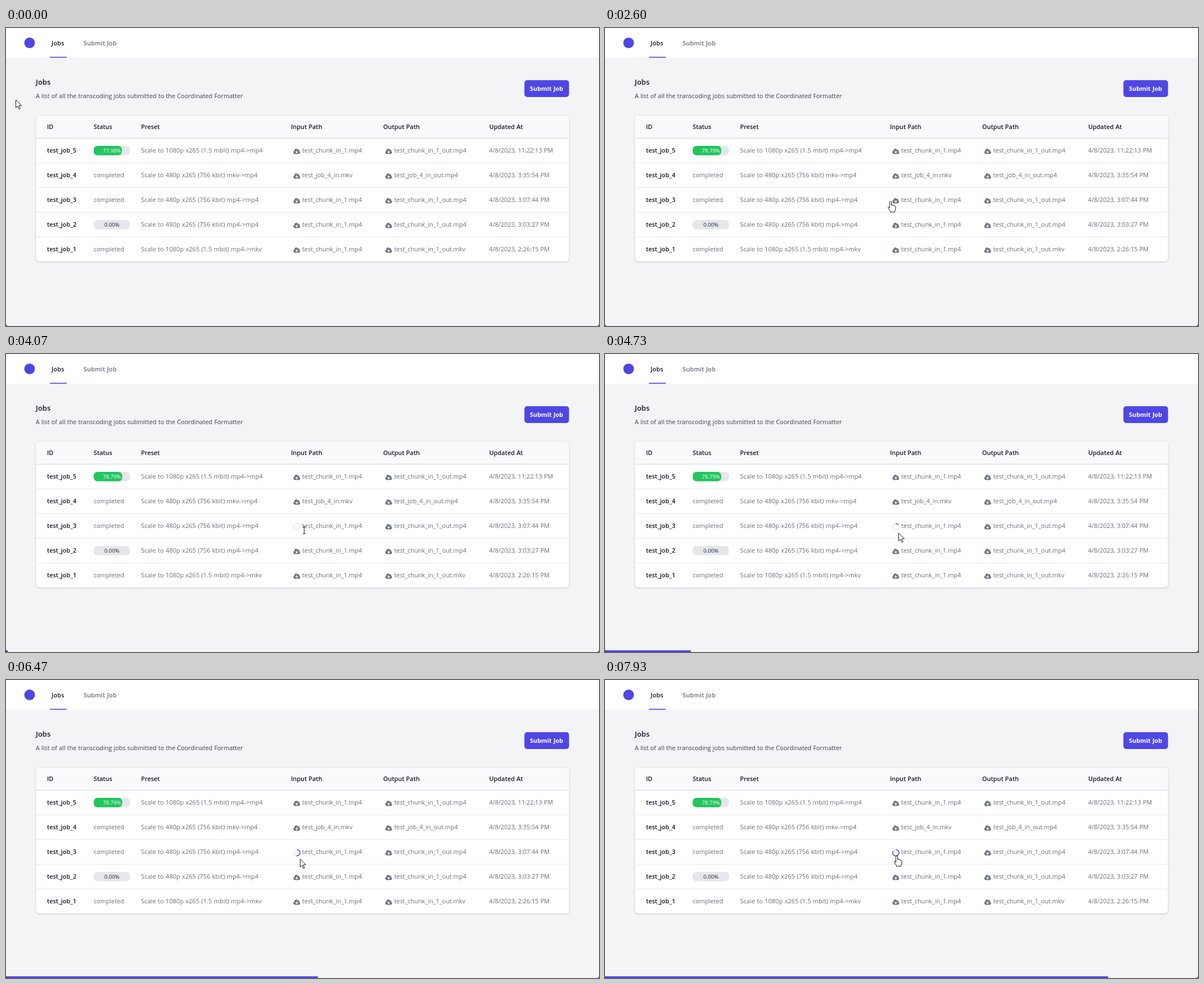
An HTML page for the animation above (8 s loop, 1055x531 px).

```html
<!DOCTYPE html>
<html lang="en">
<head>
<meta charset="utf-8">
<title>Jobs</title>
<style>
html, body { margin: 0; width: 100%; height: 100%; overflow: hidden; background: #f3f4f6; }
svg { display: block; width: 1055px; height: 531px; }
text { font: 10.9px "Open Sans", "Noto Sans", sans-serif; word-spacing: .3px; fill: #666d7b; white-space: pre; }
.bold { font-weight: 600; fill: #111827; }
.nav { font-weight: 600; letter-spacing: .16px; }
.title { font-size: 13px; }
.note { fill: #374151; }
.preset { letter-spacing: .11px; }
.button { font-weight: 700; fill: #fff; }
.percent { font-size: 9.7px; text-anchor: middle; fill: #1f2937; }
.white { font-weight: 500; fill: #fff; }
.card { fill: #fff; stroke: #e1e3e7; filter: drop-shadow(0 1px 1px #0002); }
.cloud { fill: #6b7280; }
.accent { fill: #4f46e5; }
.ring { fill: none; stroke: #e5e7eb; stroke-width: 1.5; }
.arc { stroke: #4f46e5; }
#cursor path { fill: #fff; stroke: #000; stroke-width: .9; stroke-linejoin: round; }
</style>
</head>
<body>
<svg viewBox="0 0 1055 531">
  <defs>
    <path id="cloud" transform="scale(.667) translate(-10 -10)" d="M5.5 17a4.5 4.5 0 01-1.44-8.765 4.5 4.5 0 018.302-3.046 3.5 3.5 0 014.504 4.272A4 4 0 0115 17H5.5zm5.25-9.25a.75.75 0 00-1.5 0v4.59l-1.95-2.1a.75.75 0 10-1.1 1.02l3.25 3.5a.75.75 0 001.1 0l3.25-3.5a.75.75 0 10-1.1-1.02l-1.95 2.1V7.75z"/>
  </defs>
  <rect width="1055" height="531" fill="#f3f4f6"/>
  <rect width="1055" height="53" fill="#fff"/>
  <circle class="accent" cx="42" cy="26.5" r="9.5"/>
  <rect class="accent" x="78" y="51.4" width="30" height="1.6"/>
  <rect class="accent" x="922.3" y="93" width="79.4" height="30" rx="5"/>
  <rect class="card" x="53" y="155.5" width="949" height="260.5" rx="6.5"/>
  <path d="M53.5 196V162Q53.5 156 59.5 156H995.5Q1001.5 156 1001.5 162V196Z" fill="#f9fafb"/>
  <g id="page"></g>
  <g id="spinner" transform="translate(517.5 307.8)">
    <circle class="ring" r="5.6"/>
    <circle class="ring arc" id="arc" r="5.6" pathLength="1" transform="rotate(-90)"/>
  </g>
  <rect class="accent" id="bar" y="528" height="3"/>
  <path d="M0 526.5Q0 531 4.5 531H0ZM1055 526.5Q1055 531 1050.5 531H1055Z" fill="#3b3d42"/>
  <g id="cursor">
    <path id="arrow" d="M0 0V14.2L3.3 11 5.6 16.5 7.8 15.6 5.5 10.2H10Z"/>
    <path id="hand" d="M-1.5 12V1.5Q-1.5 0 0 0T1.5 1.5V7Q1.5 6 3 6T4.3 7.5Q4.5 7 5.6 7T6.8 8.4Q7.2 8 8 8.2T9 10V13Q9 15 7.5 17V19H-.5V17.5Q-2 16-4 12Q-4.8 10.3-3.5 9.8Q-2.4 9.6-1.5 12Z"/>
    <path id="beam" d="M-2.5-6H2.5M0-6V6M-2.5 6H2.5"/>
  </g>
</svg>
<script>
const $ = id => document.getElementById(id);
const text = (x, y, s, cls = '', id = '') =>
  `<text x="${x}" y="${y}" class="${cls}" id="${id}">${s.replace('>', '&gt;')}</text>`;
const cloud = (x, y, id) => `<use href="#cloud" class="cloud" transform="translate(${x} ${y})" id="${id}"/>`;
const pill = (y, width, fill, id = '') =>
  `<rect x="156" y="${y - 12.2}" width="${width}" height="16.7" rx="6.7" fill="${fill}" id="${id}"/>`;

const hd = 'Scale to 1080p x265 (1.5 mbit) ', sd = 'Scale to 480p x265 (756 kbit) ';
const chunk = 'test_chunk_in_1';
const jobs = [
  [5, hd, chunk, 'mp4', 'mp4', '11:22:13'],
  [4, sd, 'test_job_4_in', 'mkv', 'mp4', '3:35:54'],
  [3, sd, chunk, 'mp4', 'mp4', '3:07:44'],
  [2, sd, chunk, 'mp4', 'mp4', '3:03:27'],
  [1, hd, chunk, 'mp4', 'mkv', '2:26:15']
];

function status(n, y) {
  if (n === 5) return pill(y, 64.5, '#e5e7eb') + pill(y, 50, '#22c55e', 'done') +
    text(188.5, y - .3, '', 'percent white', 'percent');
  if (n === 2) return pill(y, 64.5, '#e5e7eb') + text(188.5, y - .3, '0.00%', 'percent');
  return text(156, y, 'completed');
}

const row = ([n, preset, file, from, to, time], i) => {
  const y = 222.2 + 44 * i;
  return `<path d="M53.5 ${y - 25.9}H1001.5" stroke="${i ? '#e5e7eb' : '#d1d5db'}"/>` +
    text(73, y, 'test_job_' + n, 'bold') + status(n, y) +
    text(240.3, y, `${preset}${from}->${to}`, 'preset') +
    cloud(517.3, y - 2.4, 'in' + n) + text(527, y, `${file}.${from}`) +
    cloud(680.8, y - 2.4, 'out' + n) + text(690.7, y, `${file}_out.${to}`) +
    text(859.5, y, `4/8/2023, ${time} PM`);
};

const heads = { ID: 73, Status: 156, Preset: 240.3, 'Input Path': 507, 'Output Path': 671, 'Updated At': 859.7 };
$('page').innerHTML =
  text(81, 31.4, 'Jobs', 'bold nav') + text(138, 31.4, 'Submit Job', 'nav') +
  text(53, 101.3, 'Jobs', 'bold title') +
  text(53, 125.2, 'A list of all the transcoding jobs submitted to the Coordinated Formatter', 'note') +
  text(932, 112, 'Submit Job', 'button') +
  Object.entries(heads).map(([s, x]) => text(x, 180, s, 'bold')).join('') +
  jobs.map(row).join('');

// Pointer stops: time, x, y, shape from then on
const stops = [
  [0, 17.5, 128, 'arrow'], [930, 544, 224, 'arrow'], [1400, 228.5, 189, 'arrow'],
  [2550, 508, 309, 'hand'], [3700, 510, 307, 'hand'], [4050, 530.5, 314, 'beam'],
  [4500, 522.5, 319, 'arrow'], [7200, 523.5, 319, 'arrow'], [7500, 519, 313, 'hand']
];
const ease = u => u * u * (3 - 2 * u);

function pointer(t) {
  const i = stops.findLastIndex(s => s[0] <= t);
  const [t0, x0, y0, shape] = stops[i];
  const [t1, x1, y1] = stops[i + 1] || [8000, x0, y0];
  const u = ease((t - t0) / (t1 - t0));
  return { x: x0 + (x1 - x0) * u, y: y0 + (y1 - y0) * u, shape };
}

const step = 200 / 3; // 15 pictures a second
function draw(now) {
  const t = Math.floor((now % 8000 + 4) / step) * step % 8000;
  const percent = t < 2260 ? 77.98 : 78.79;
  $('percent').textContent = percent + '%';
  $('done').setAttribute('width', 64.5 * percent / 100);

  const loading = t > 3725;
  const width = loading ? Math.max(3, (t - 4075) * .232) : 0;
  $('spinner').style.display = loading ? '' : 'none';
  $('in3').style.display = loading ? 'none' : '';
  $('arc').setAttribute('stroke-dasharray', `${width / 1055} 2`);
  $('bar').setAttribute('width', width);

  const { x, y, shape } = pointer(t);
  for (const path of $('cursor').children) path.style.display = path.id === shape ? '' : 'none';
  $('cursor').setAttribute('transform', `translate(${x} ${y})`);
}

const start = performance.now();
function tick() {
  draw(performance.now() - start);
  requestAnimationFrame(tick);
}
tick();
</script>
</body>
</html>
```
